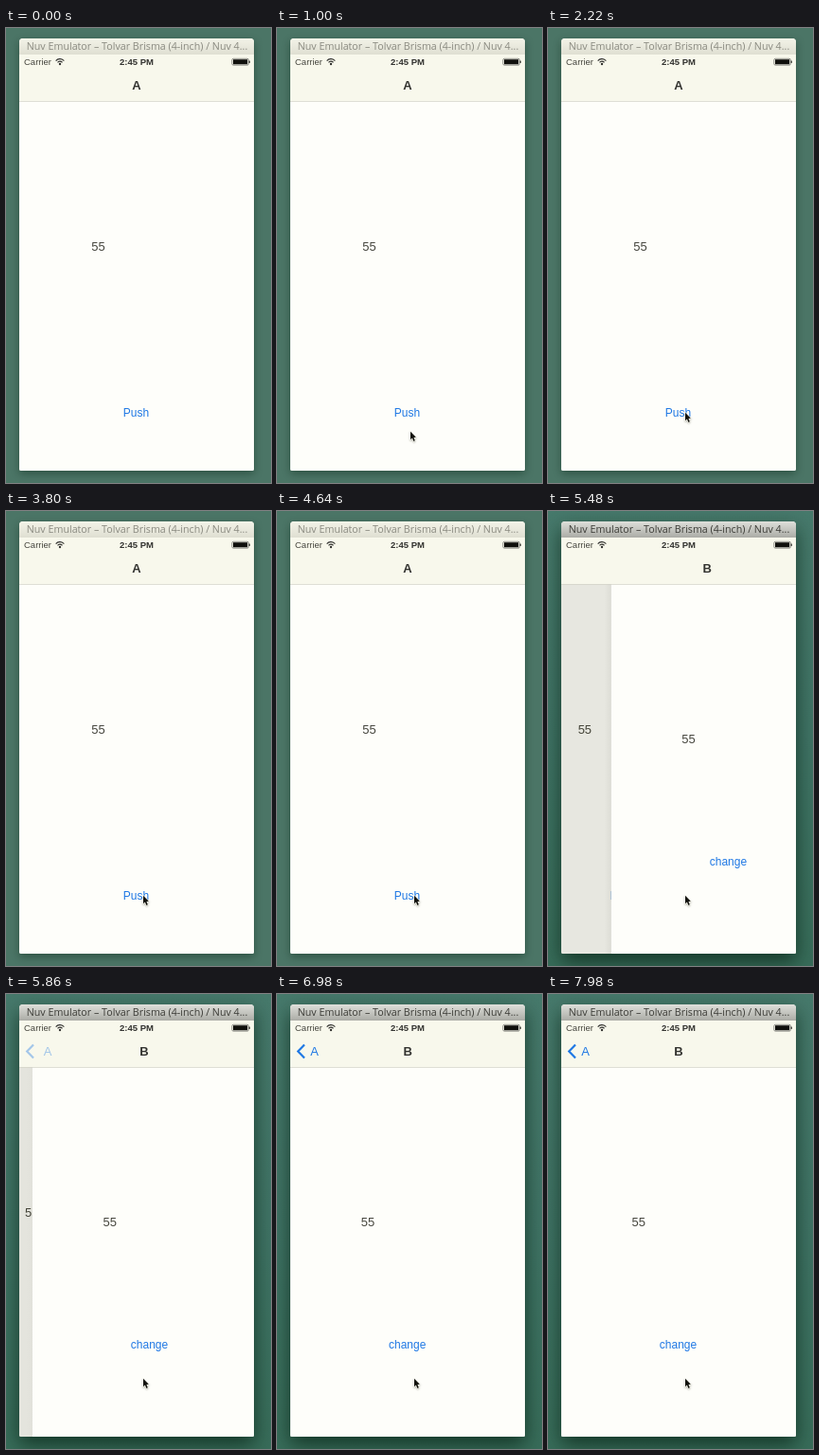
An HTML page with a canvas that plays this animation: 280 px wide and 480 px high, repeating every 8000 ms.

```html
<!DOCTYPE html>
<html lang="en">
<head>
<meta charset="utf-8">
<title>Push transition</title>
<style>
  html, body { margin: 0; width: 100%; height: 100%; overflow: hidden; background: #4b7566; }
  canvas { display: block; width: 280px; height: 480px; }
</style>
</head>
<body>
<canvas id="stage"></canvas>
<script>
const W = 280, H = 480, LOOP = 8000;
const win = { x: 14, y: 11, w: 248, h: 456 };
const BAR = 28, NAV = 77;
const ACTIVATE = 4720, PRESS = 4740, PUSH = 4826;
const SANS = '"Liberation Sans", Arial, sans-serif';
const TITLE = '"Open Sans", "DejaVu Sans", sans-serif';
const PAPER = '#fefefa', CHROME = '#f8f8ec', INK = '#46463e', DARK = '#333330', BLUE = '#1f78e4';

const canvas = document.getElementById('stage');
const ctx = canvas.getContext('2d');
const ratio = window.devicePixelRatio || 1;
canvas.width = W * ratio;
canvas.height = H * ratio;

const clamp = v => Math.max(0, Math.min(1, v));
const mix = (a, b, u) => a + (b - a) * u;

// Critically damped spring, from 0 to 1
function spring(ms) {
  if (ms <= 0) return 0;
  const u = ms * 0.00444;
  return 1 - (1 + u) * Math.exp(-u);
}

function text(str, x, y, font, color, align = 'center', alpha = 1) {
  if (alpha <= 0) return;
  ctx.save();
  ctx.globalAlpha *= alpha;
  ctx.font = font;
  ctx.fillStyle = color;
  ctx.textAlign = align;
  ctx.textBaseline = 'alphabetic';
  ctx.fillText(str, x, y);
  ctx.restore();
}

function vertical(y0, y1, ...colors) {
  const g = ctx.createLinearGradient(0, y0, 0, y1);
  colors.forEach((c, i) => g.addColorStop(i / (colors.length - 1), c));
  return g;
}

function windowPath() {
  ctx.beginPath();
  ctx.roundRect(win.x, win.y, win.w, win.h, [4, 4, 2, 2]);
}

function desktop(active) {
  ctx.fillStyle = active ? vertical(0, H, '#46786a', '#3f7264', '#376b58') : '#4b7566';
  ctx.fillRect(0, 0, W, H);
  ctx.save();
  ctx.shadowColor = active ? 'rgba(0,25,10,.65)' : 'rgba(0,30,15,.4)';
  ctx.shadowBlur = (active ? 20 : 8) * ratio;
  ctx.shadowOffsetY = (active ? 8 : 3) * ratio;
  ctx.fillStyle = PAPER;
  windowPath();
  ctx.fill();
  ctx.restore();
}

function titleBar(active) {
  ctx.fillStyle = active
    ? vertical(win.y, BAR, '#dedfda', '#abaca6')
    : vertical(win.y, BAR, '#f3f3e8', '#dfdfd2');
  ctx.fillRect(win.x, win.y, win.w, BAR - win.y);
  text('Nuv Emulator – Tolvar Brisma (4-inch) / Nuv 4...', 138.5, 23,
    '10.7px ' + TITLE, active ? '#3b3b36' : '#8a8a80');
}

function statusBar() {
  text('Carrier', 19, 39, '9.5px ' + SANS, INK, 'left');
  text('2:45 PM', 138, 39, 'bold 9.5px ' + SANS, DARK);
  ctx.strokeStyle = ctx.fillStyle = DARK;
  ctx.lineWidth = 1.2;
  for (const r of [3.3, 5.8]) {
    ctx.beginPath();
    ctx.arc(57, 38.5, r, -Math.PI * 0.77, -Math.PI * 0.23);
    ctx.stroke();
  }
  ctx.beginPath();
  ctx.arc(57, 38, 1.2, 0, Math.PI * 2);
  ctx.fill();

  ctx.lineWidth = 0.5;
  ctx.beginPath();
  ctx.roundRect(238.8, 32.3, 17.6, 6.9, 1.5);
  ctx.stroke();
  ctx.fillStyle = '#10100c';
  ctx.fillRect(240, 33.2, 15.2, 5.1);
  ctx.fillRect(256.7, 34.6, 1, 2.3);
}

function navBar(p) {
  ctx.fillStyle = CHROME;
  ctx.fillRect(win.x, BAR, win.w, NAV - BAR);
  ctx.fillStyle = '#d2d2c6';
  ctx.fillRect(win.x, NAV, win.w, 0.7);
  statusBar();
  const bold = 'bold 13px ' + SANS;
  text('A', 138 - 74.4 * p, 65, bold, DARK, 'center', 1 - p * 1.4);
  if (p <= 0) return;
  text('B', 138 + 141 * (1 - p), 65, bold, DARK, 'center', clamp(p * 1.3));
  const back = clamp((p - 0.92) / 0.06);
  text('A', 39.5 + 80 * (1 - p), 65, '13px ' + SANS, BLUE, 'center', back);
  ctx.save();
  ctx.globalAlpha = back;
  ctx.strokeStyle = BLUE;
  ctx.lineWidth = 2.2;
  ctx.beginPath();
  ctx.moveTo(29, 53.5);
  ctx.lineTo(22.2, 60.5);
  ctx.lineTo(29, 67.5);
  ctx.stroke();
  ctx.restore();
}

function pages(t, p) {
  const shift = -0.3 * win.w * p;
  const edge = win.x + win.w * (1 - p);
  const pressed = clamp((t - PRESS) / 60);
  ctx.fillStyle = PAPER;
  ctx.fillRect(win.x, NAV, win.w, win.y + win.h - NAV);
  text('55', 97.4 + shift, 235, '13px ' + SANS, INK);
  text('Push', 137.5 + shift, 410, '12px ' + SANS, BLUE, 'center', mix(1, 0.38, pressed));
  if (p <= 0) return;

  ctx.fillStyle = `rgba(40,40,0,${0.12 * Math.sqrt(p)})`;
  ctx.fillRect(win.x, NAV, win.w, H);
  const g = ctx.createLinearGradient(edge - 7, 0, edge, 0);
  g.addColorStop(0, 'rgba(50,50,40,0)');
  g.addColorStop(1, `rgba(50,50,40,${0.3 * (1 - p)})`);
  ctx.fillStyle = g;
  ctx.fillRect(edge - 7, NAV, 7, H);

  ctx.fillStyle = PAPER;
  ctx.fillRect(edge, NAV, win.w, H);
  const offset = edge - win.x;
  text('55', 95.7 + offset, 245, '13px ' + SANS, INK);
  text('change', 137.5 + offset, 374, '12px ' + SANS, BLUE);
}

// Pointer path: time, x, y
const path = [[550, 128, 482], [960, 141, 425], [1120, 141, 425], [1560, 145, 405]];

function pointer(t) {
  if (t < path[0][0]) return;
  let [, x, y] = path[path.length - 1];
  for (let i = 1; i < path.length; i++) {
    const a = path[i - 1], b = path[i];
    if (t < b[0]) {
      const u = (t - a[0]) / (b[0] - a[0]);
      const e = u * u * (3 - 2 * u);
      x = mix(a[1], b[1], e);
      y = mix(a[2], b[2], e);
      break;
    }
  }
  ctx.save();
  ctx.translate(x, y + 0.8);
  ctx.scale(0.84, 0.84);
  ctx.beginPath();
  [[0, 0], [0, 10], [2.2, 8], [4, 12], [5.8, 11.2], [4.1, 7.3], [7, 7.2]]
    .forEach(([px, py]) => ctx.lineTo(px, py));
  ctx.closePath();
  ctx.lineJoin = 'round';
  ctx.lineWidth = 1.4;
  ctx.strokeStyle = '#fffff4';
  ctx.shadowColor = 'rgba(40,40,20,.35)';
  ctx.shadowBlur = 2 * ratio;
  ctx.shadowOffsetY = ratio;
  ctx.stroke();
  ctx.shadowColor = 'transparent';
  ctx.fillStyle = '#12120e';
  ctx.fill();
  ctx.restore();
}

function draw(t) {
  const active = t >= ACTIVATE;
  const p = spring(t - PUSH);
  ctx.setTransform(ratio, 0, 0, ratio, 0, 0);
  desktop(active);
  ctx.save();
  windowPath();
  ctx.clip();
  pages(t, p);
  navBar(p);
  titleBar(active);
  ctx.restore();
  pointer(t);
}

const start = performance.now();
function tick() {
  draw((performance.now() - start) % LOOP);
  requestAnimationFrame(tick);
}
tick();
</script>
</body>
</html>
```
